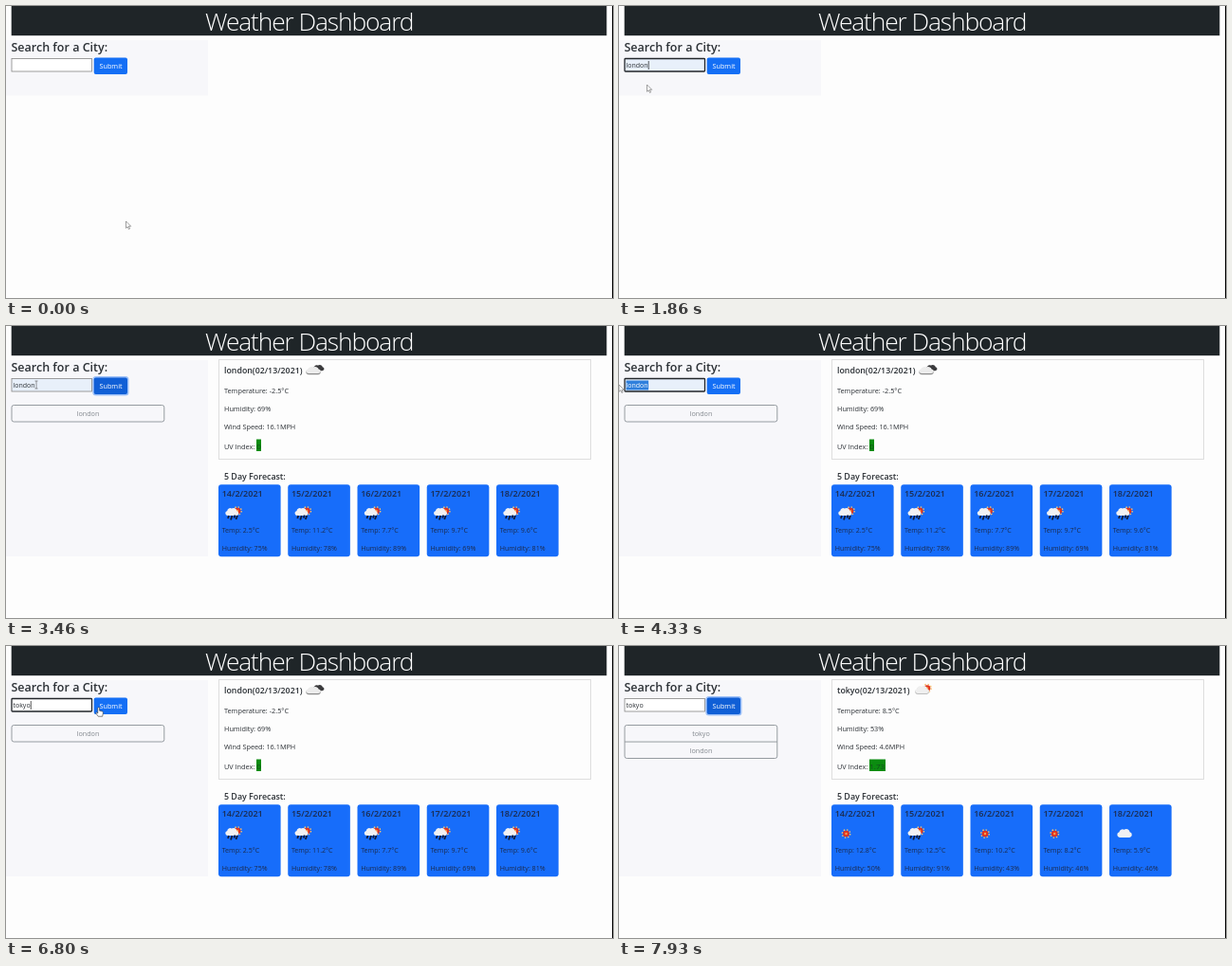
Recreate the animation shown at these times as an HTML page. Size 640 by 308 pixels, loop 8 s.

```html
<!DOCTYPE html>
<html lang="en">
<head>
<meta charset="utf-8">
<title>Weather Dashboard</title>
<style>
html, body { margin: 0; width: 100%; height: 100%; overflow: hidden; background: #fdfdfd; }
svg { display: block; width: 640px; height: 308px; }
text { font-family: "Open Sans", "Noto Sans", sans-serif; fill: #2b3035; white-space: pre; }
.title { font-size: 26.4px; font-weight: 300; letter-spacing: -1.130px; fill: #fff; }
</style>
</head>
<body>
<svg viewBox="0 0 640 308">
  <defs>
    <path id="puff" d="M3 11a3 3 0 0 1-.4-5.900A3.600 3.600 0 0 1 8 2.400a4 4 0 0 1 6.300 2.700A3 3 0 0 1 14 11Z"/>
    <g id="sun">
      <circle r="4.200" fill="none" stroke="#f7c070" stroke-width="1.400" stroke-dasharray="1.500 1.800"/>
      <circle r="3.300" fill="#e2331c"/><circle r="1.200" fill="#f4a050"/>
    </g>
    <g id="clear"><use href="#sun" x="8.500" y="7.500"/></g>
    <g id="cloud"><use href="#puff" fill="#f1f1f3" transform="translate(1 1) scale(.95)"/></g>
    <g id="rain">
      <use href="#sun" x="13" y="4.500"/>
      <use href="#puff" fill="#f1f1f3" transform="scale(.86)"/>
      <path d="M4 9.500l-1 3M7.500 9.500l-1.500 4.500M10.500 9l-1 3M13 9.500l-1.500 4" stroke="#111a35" stroke-width="1.800"/>
    </g>
    <g id="broken">
      <use href="#puff" fill="#3b3b3d" transform="translate(7 0) scale(.75 .65)"/>
      <use href="#puff" fill="#8d8d8d" transform="translate(0 2.600) scale(.95 .78)"/>
      <use href="#puff" fill="#ececec" transform="translate(0 1.700) scale(.95 .75)"/>
    </g>
    <g id="few">
      <use href="#sun" x="13" y="4.500"/>
      <use href="#puff" fill="#a9a9a9" transform="translate(0 1.400) scale(.9 .85)"/>
      <use href="#puff" fill="#efefef" transform="translate(0 .6) scale(.9 .85)"/>
    </g>
    <path id="arrow" d="M0 0v7.300l1.700-1.500 1.200 2.600 1.200-.5-1.200-2.600h2.300Z" fill="#fff" stroke="#777" stroke-width=".7"/>
    <path id="hand" d="M-.9.5Q0-.6.9.5V3.500l2.900.7q1 .4.900 1.600L4 9.500H-.5L-3 6q.3-1.200 1.300-.4l.8.700Z" fill="#fff" stroke="#333" stroke-width=".6"/>
    <path id="beam" d="M-1.500-4H1.500M0-4V4M-1.500 4H1.500" fill="none" stroke="#555" stroke-width=".6"/>
  </defs>
  <rect x="5.700" width="627.600" height="31.200" fill="#1f2528"/>
  <rect x="639" width="1" height="308" fill="#080808"/>
  <text x="210" y="26" class="title">Weather Dashboard</text>
  <g id="view"></g>
  <use id="pointer"/>
</svg>
<script>
const LOOP = 8000;
const $ = id => document.getElementById(id);

const cities = {
  london: {
    icon: 'broken', iconX: 316, facts: ['-2.5°C', '69%', '16.1MPH'], uv: '0', uvW: 5,
    days: [['2.5', 75], ['11.2', 78], ['7.7', 89], ['9.7', 69], ['9.6', 81]],
    sky: ['rain', 'rain', 'rain', 'rain', 'rain']
  },
  tokyo: {
    icon: 'few', iconX: 312, facts: ['8.5°C', '53%', '4.6MPH'], uv: '1.73', uvW: 17,
    days: [['12.8', 50], ['12.5', 91], ['10.2', 43], ['8.2', 46], ['5.9', 46]],
    sky: ['clear', 'rain', 'clear', 'clear', 'cloud']
  }
};

// Page state changes: [time, patch]
const steps = [
  [0, { text: '', focus: '', fill: false, sel: 0, list: [], city: '', loose: false, fresh: 0, typed: 0 }],
  [930, { focus: 'input', typed: 930 }],
  [1600, { text: 'l', typed: 1600 }],
  [1660, { text: 'lo', typed: 1660 }],
  [1860, { text: 'london', fill: true, typed: 1860 }],
  [2530, { focus: 'button' }],
  [2660, { list: ['london'] }],
  [2730, { city: 'london', fresh: 5 }],
  [3730, { focus: 'input', typed: 3730 }],
  [3800, { sel: .35 }], [3870, { sel: .7 }], [3930, { sel: 1 }],
  [4660, { text: 't', sel: 0, fill: false, typed: 4660 }],
  [4860, { text: 'to', typed: 4860 }],
  [5060, { text: 'tok', typed: 5060 }],
  [5200, { text: 'toky', typed: 5200 }],
  [5400, { text: 'tokyo', typed: 5400 }],
  [7000, { focus: 'button' }],
  [7060, { list: ['tokyo', 'london'] }],
  [7130, { city: 'tokyo', loose: true, fresh: 0 }],
  [7260, { loose: false, fresh: 1 }],
  [7330, { fresh: 5 }]
];

// Pointer path: [time, x, y, shape]
const path = [
  [0, 126.5, 227, 'arrow'], [60, 126.5, 227, 'arrow'], [760, 38, 64, 'beam'],
  [860, 36, 62, 'beam'], [1660, 36, 62, 'beam'], [1860, 29.5, 83, 'arrow'],
  [1990, 29.5, 83, 'arrow'], [2400, 94.5, 64, 'hand'], [3000, 94.5, 64, 'hand'],
  [3130, 80, 63, 'beam'], [3460, 32, 62, 'beam'], [3730, 32, 62, 'beam'],
  [4000, 0, 62, 'arrow'], [5730, 0, 62, 'arrow'], [5930, 18, 63, 'beam'],
  [6460, 18, 63, 'beam'], [6900, 109.5, 65, 'hand'], [7600, 109.5, 65, 'hand'],
  [7860, 240, 88, ''], [8000, 240, 88, '']
];

const rect = (x, y, w, h, fill, extra = '') =>
  `<rect x="${x}" y="${y}" width="${w}" height="${h}" fill="${fill}" ${extra}/>`;
const text = (x, y, size, str, extra = '') =>
  `<text x="${x}" y="${y}" font-size="${size}" ${extra}>${str}</text>`;
const icon = (name, x, y) => `<use href="#${name}" x="${x}" y="${y}"/>`;
const bold = 'font-weight="600"';

const pen = document.createElement('canvas').getContext('2d');
function widthOf(str) {
  pen.font = '7px "Open Sans", "Noto Sans", sans-serif';
  return pen.measureText(str).width;
}

function searchBox(s, caret) {
  const on = s.focus === 'input', w = widthOf(s.text);
  const bottom = s.city ? (s.loose ? 231 : 243) : s.list.length ? 103 : 94.5;
  let out = rect(0, 36, 213, bottom - 36, '#f7f7fa');
  out += text(5.5, 48, 12.5, 'Search for a City:', bold);
  out += rect(6, 55.5, 84.5, 13.5, s.fill ? '#e8f0fa' : '#fff',
    on ? 'stroke="#22262a" stroke-width="1.3" rx=".8"' : 'stroke="#858585" stroke-width=".8"');
  out += text(7.5, 65, 7, s.text);
  if (s.sel) {
    const x = 7.5 + w * (1 - s.sel);
    out += `<clipPath id="mark"><rect x="${x}" y="57.5" width="${w * s.sel + .5}" height="10"/></clipPath>`;
    out += `<g clip-path="url(#mark)">${rect(7, 57, 40, 11, '#2f7fdc')}${text(7.5, 65, 7, s.text, 'style="fill:#fff"')}</g>`;
  } else if (on && caret) out += rect(7.7 + w, 58, .7, 9, '#111');

  const hot = s.focus === 'button';
  if (hot) out += rect(91.3, 53, 38.2, 20.4, '#9cc0f8', 'rx="3.5"');
  out += rect(92.7, 54.6, 35.3, 17.4, hot ? '#105fd6' : '#146ff5', 'rx="2"');
  out += text(110.5, 66.2, 7.3, 'Submit', 'text-anchor="middle" style="fill:#fff"');

  const n = s.list.length;
  if (n) out += rect(6, 83.5, 160.8, 17.5 * n, 'none', 'stroke="#8b9197" stroke-width=".9" rx="2.3"');
  if (n > 1) out += rect(6, 100.6, 160.8, .9, '#8b9197');
  s.list.forEach((name, i) => {
    out += text(86.5, 95 + 17.5 * i, 7.2, name, 'text-anchor="middle" style="fill:#80868c"');
  });
  return out;
}

function report(s) {
  const c = cities[s.city], up = s.loose ? 12 : 0;
  let out = rect(224.5, 35.5, 392, 105 - up, 'none', 'stroke="#dedede"');
  out += text(230, s.loose ? 45 : 49.5, 8.8, s.city + '(02/13/2021)', bold);
  if (!s.loose) out += icon(c.icon, c.iconX, 40);
  ['Temperature', 'Humidity', 'Wind Speed'].forEach((label, i) => {
    out += text(230, 71.3 + 18.7 * i - up, 7.3, `${label}: ${c.facts[i]}`);
  });
  out += text(230, 129.7 - up, 7.3, 'UV Index:');
  out += rect(264, 119.5 - up, c.uvW, 12.5, '#0b8c10');
  out += text(264.3, 129.7 - up, 8, c.uv, 'style="fill:#124d1c"');
  out += text(230, 161.5 - up, 8.9, '5 Day Forecast:', bold);
  c.days.forEach(([temp, hum], i) => {
    const x = 224 + 73.25 * i, y = 167.3 - up;
    const ready = s.fresh === 5 || s.fresh && i > 2;
    const ink = 'style="fill:#1c2b4d"';
    out += rect(x, y, 65.6, 75.9, '#176dfa', 'rx="3"');
    out += text(x + 3.7, y + 13, 9, `${14 + i}/2/2021`, bold + ' ' + ink);
    out += icon(ready ? c.sky[i] : 'rain', x + 7, y + 23.2);
    out += text(x + 3.7, y + 50.6, 7.1, `Temp: ${temp}°C`, ink);
    out += text(x + 3.7, y + 69.4, 7.1, `Humidity: ${hum}%`, ink);
  });
  return out;
}

function movePointer(t) {
  let i = 0;
  while (i < path.length - 2 && path[i + 1][0] <= t) i++;
  const [t0, x0, y0, from] = path[i], [t1, x1, y1, to] = path[i + 1];
  const k = (t - t0) / (t1 - t0), e = k * k * (3 - 2 * k);
  const shape = from && (e > .85 && to ? to : from);
  $('pointer').setAttribute('href', shape ? '#' + shape : '#none');
  $('pointer').setAttribute('transform', `translate(${x0 + (x1 - x0) * e} ${y0 + (y1 - y0) * e})`);
}

let shown = '';
function draw() {
  const t = performance.now() % LOOP;
  const s = Object.assign({}, ...steps.filter(([at]) => at <= t).map(([, patch]) => patch));
  const caret = Math.floor((t - s.typed) / 530) % 2 === 0;
  const html = searchBox(s, caret) + (s.city ? report(s) : '');
  if (html !== shown) $('view').innerHTML = shown = html;
  movePointer(t);
  requestAnimationFrame(draw);
}
draw();
</script>
</body>
</html>
```
